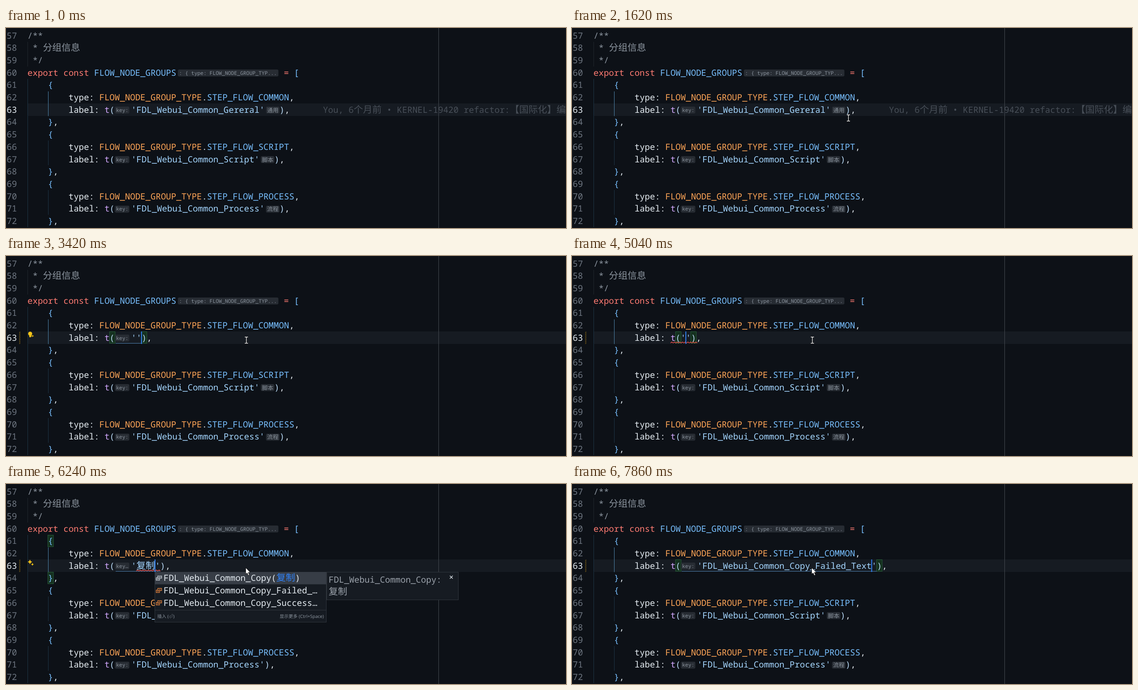
Recreate the animation shown at these times as an HTML page. Size 1251 px wide and 448 px high, loop 8 s.

```html
<!DOCTYPE html>
<html lang="zh-CN">
<head>
<meta charset="utf-8">
<title>Editor</title>
<style>
html, body { margin: 0; width: 100%; height: 100%; overflow: hidden; background: #0d1117; }
svg { display: block; width: 100vw; height: 100vh; }
text { white-space: pre; font: 500 19.1px "Noto Sans Mono", monospace; text-rendering: geometricPrecision; }
text.han { font: 300 20.8px "Noto Sans CJK SC", "Noto Sans CJK", sans-serif; }
text.hint { font-size: 11.4px; font-weight: 400; }
text.tail { font: 300 12.8px "Noto Sans CJK SC", "Noto Sans CJK", sans-serif; }
text.ime { font: 13px "Noto Sans", "Noto Sans CJK SC", sans-serif; }
text.foot { font: 300 10px "Noto Sans", "Noto Sans CJK SC", sans-serif; }
</style>
</head>
<body>
<svg viewBox="0 0 1251 448" preserveAspectRatio="none"><g id="page"></g><g id="live"></g></svg>
<script>
const CH = 11.46, HAN = 20.8, ROW = 27.67, LEFT = 48, LOOP = 8000, STEP = 60;
const C = {
  fg: '#e6edf3', dim: '#8b949e', num: '#6e7681', key: '#ff7b72', name: '#79c0ff', type: '#ffa657',
  fn: '#d2a8ff', str: '#a5d6ff', par: '#b9d9f5', blame: '#484f58', blue: '#2f81f7', panel: '#161b22',
  edge: '#30363d', chip: '#272c33', row: '#373d46', gold: '#f5c518', guide: '#1d3546'
};
const PRE = 'FDL_Webui_Common_';
const isHan = c => c >= '\u3000';
const width = s => [...s].reduce((w, c) => w + (isHan(c) ? HAN : CH), 0);
const base = row => Math.round(23.8 + ROW * row);
const rowTop = row => Math.round(3.3 + ROW * row);

const rect = (x, y, w, h, fill, more = '') =>
  `<rect x="${x}" y="${y}" width="${w}" height="${h}" fill="${fill}" ${more}/>`;
const path = (d, stroke, fill = 'none', w = 1) =>
  `<path d="${d}" stroke="${stroke}" fill="${fill}" stroke-width="${w}"/>`;
const label = (x, y, s, fill, cls = '') => `<text x="${x}" y="${y}" fill="${fill}" class="${cls}">${s}</text>`;

// Code text: Latin runs sit on the column grid, Han runs are wider.
function write(x, y, s, fill) {
  let out = '';
  for (const run of s.match(/[\u3000-\uffff]+|[^\u3000-\uffff]+/g) || []) {
    out += label(x.toFixed(2), y, run, fill, isHan(run[0]) ? 'han' : '');
    x += width(run);
  }
  return out;
}
function line(col, row, ...parts) {
  let x = LEFT + col * CH, out = '';
  for (const [s, fill] of parts) {
    out += write(x, base(row), s, fill);
    x += width(s);
  }
  return out;
}
const chip = (x, row, w, s, cls = 'hint') =>
  rect(x, rowTop(row) + 7, w, 15.5, C.chip, 'rx="3"') +
  label(x + 2.5, base(row) + (cls === 'tail' ? -1.4 : -2.2), s, C.dim, cls);
const match = (x, row) =>
  rect(x, rowTop(row) + .5, CH + 1, 26, '#15301f', 'stroke="#28603a"');
const guide = (x, row, n, fill) => rect(x, rowTop(row), 1, ROW * n, fill);

// The "label: t('…')," row; returns markup and the places inside it.
function call(row, { hint = '', body = '', tail = '' }) {
  const open = LEFT + 16 * CH;
  const from = open + CH + (hint ? 37 : 0);
  const end = from + width(body);
  const close = end + (tail ? 33 : 0);
  const svg = line(8, row, ['label: ', C.fg], ['t', C.fn], ['(', C.par]) +
    (hint ? chip(243.5, row, 32, hint) : '') +
    write(from, base(row), body, C.str) +
    (tail ? chip(end + 3, row, 30, tail, 'tail') : '') +
    write(close, base(row), ')', C.par) + write(close + CH, base(row), ',', C.fg);
  return { svg, open, from, end, close };
}

function drawPage() {
  let s = '';
  for (let i = 0; i < 16; i++) s += label(1.6, base(i), 57 + i, i === 6 ? C.fg : C.num);
  s += guide(48, 1, 2, '#21262d') + guide(48, 4, 12, C.guide);
  for (const r of [9, 13]) s += guide(94, r, 2, C.guide);
  s += line(0, 0, ['/**', C.dim]) + line(1, 1, ['* 分组信息', C.dim]) + line(1, 2, ['*/', C.dim]);
  s += line(0, 3, ['export const ', C.key], ['FLOW_NODE_GROUPS', C.name]);
  s += chip(384, 3, 224.5, ': { type: FLOW_NODE_GROUP_TYP...');
  s += write(620.4, base(3), '=', C.key) + write(643.3, base(3), '[', C.name);
  ['COMMON', 'SCRIPT', 'PROCESS'].forEach((kind, i) => {
    s += line(8, 5 + i * 4, ['type: ', C.fg], ['FLOW_NODE_GROUP_TYPE', C.type], ['.', C.fg],
      ['STEP_FLOW_' + kind, C.name], [',', C.fg]);
  });
  return s;
}

// Each entry changes part of the state at its time.
const steps = [
  [0, { hint: 'key:', body: "'FDL_Webui_Common_Gereral'", tail: '通用', blame: 1, band: 1, tails: 1, pair: '' }],
  [2340, { cur: 22, pair: 'p', link: 1 }],
  [2400, { sel: 1, band: 0, cur: 25 }],
  [2760, { bulb: 'lamp' }],
  [2940, { sel: 0, band: 1, body: "''", tail: '', cur: 1, blame: 0 }],
  [3060, { dirty: 1 }],
  [3420, { cur: 2 }],
  [3660, { body: "'", cur: 1, pair: '' }],
  [3720, { pair: 'b', link: 0 }],
  [3780, { hint: '' }],
  [3840, { body: '', cur: 0, pair: 'p' }],
  [3900, { bulb: '' }],
  [4140, { body: "'", cur: 1, pair: 'o' }],
  [4560, { wave: [220, 256], pair: '' }],
  [4620, { cur: -1 }],
  [4800, { body: '', cur: 0, pair: 'p' }],
  [5040, { body: "''", cur: 1, wave: [220, 278] }],
  [5520, { body: "'f'", cur: 2, comp: 1 }],
  [5580, { hint: 'key:', wave: 0, link: 1, ime: 'f', bulb: 'stars' }],
  [5640, { popup: 'all' }],
  [5700, { tails: 0 }],
  [5760, { body: "'fu'", cur: 3, ime: 'fu' }],
  [5880, { body: "'fuz'", cur: 4, ime: 'fuzhi' }],
  [5940, { body: "'fuzh'", cur: 5 }],
  [6000, { body: "'fuzhi'", cur: 6 }],
  [6120, { body: "'复制'", cur: 3, comp: 0, ime: '', popup: '', pair: 'b', hint: 'key…' }],
  [6180, { popup: 'copy', pick: 0, doc: 0, wave: [291, 344] }],
  [6300, { pair: 'p' }],
  [6420, { hint: 'key:', wave: 0, tails: 1 }],
  [6720, { cur: -1, pick: 1 }],
  [6780, { doc: 1 }],
  [6960, { bulb: '' }],
  [7200, { cur: 3 }],
  [7680, { cur: -1 }],
  [7860, { body: "'FDL_Webui_Common_Copy_Failed_Text'", cur: 34, popup: '' }]
];
const stateAt = t => Object.assign({}, ...steps.filter(s => s[0] <= t).map(s => s[1]));

const track = [
  [180, 977, 100.5], [360, 800, 130], [540, 665, 162], [720, 595, 186], [960, 562, 192],
  [1140, 557, 206], [1320, 590, 216], [1500, 633, 211], [1620, 617.5, 201.5], [1740, 614, 162],
  [1800, 600, 166], [1920, 575, 168], [2160, 537, 188.5]
];
function mouseAt(t) {
  const i = track.findIndex(p => p[0] > t);
  if (i < 0) return track[track.length - 1].slice(1);
  const [a, b] = [track[i - 1], track[i]], k = (t - a[0]) / (b[0] - a[0]);
  return [a[1] + (b[1] - a[1]) * k, a[2] + (b[2] - a[2]) * k];
}
function mouse(t) {
  if (t < track[0][0]) return '';
  if (t >= 5640) return path('M535.5 187.500v14.500l3.200-3 2.500 5.800 2.500-1-2.500-5.700h4.500z'.replace(/00/g, ''), '#000', '#fff', .8);
  const [x, y] = mouseAt(t);
  const d = `M${x - 3.5} ${y - 7}h2.5l1 1 1-1h2.5M${x} ${y - 6}v12M${x - 3.5} ${y + 7}h2.5l1-1 1 1h2.5`;
  return path(d, '#000', 'none', 2.4) + path(d, '#fff', 'none', 1.3);
}

const star = (x, y, r) => {
  const q = r * .32;
  return path(`M${x} ${y - r}L${x + q} ${y - q} ${x + r} ${y} ${x + q} ${y + q} ${x} ${y + r} ${x - q} ${y + q} ${x - r} ${y} ${x - q} ${y - q}z`, 'none', C.gold);
};
const bulbs = {
  lamp: `<circle cx="54" cy="174" r="4.5" fill="${C.gold}"/>` + rect(52, 177, 4, 5, C.gold, 'rx="1"') +
    path('M57 178l2 3M59 177.5l2.5 2.5', C.gold, 'none', 1.6),
  stars: star(53.5, 174.5, 5.2) + star(59, 180, 3.2)
};

function wave(a, b) {
  let d = `M${a} 195`;
  for (let x = a, up = true; x < b; x += 3, up = !up) d += `l3 ${up ? -2.6 : 2.6}`;
  return path(d, '#f85149', 'none', 1.1);
}

const all = ['Accuracy_Sea…', 'Activator_Mo…', 'Add(添加)', 'Add_Conditio…', 'Add_Field(添…',
  'Add_Field_Va…', 'Add_Row(添加…', 'Add_Task(添…', 'Add_To(添加…'];
const copies = ['Copy(复制)', 'Copy_Failed_…', 'Copy_Success…'];

function icon(x, y, c) {
  return path(`M${x + 4} ${y - 5}h8.5v5h-8.5zM${x + 8} ${y}v4.5h-7.5v-5.5h3.5`, c, 'none', 1.2) +
    path(`M${x + 6} ${y - 2.5}h4.5M${x + 2} ${y + 2}h4`, c, 'none', 1);
}
function docs(x, a, b) {
  return rect(x + .5, 197.5, 294, 62, C.panel, `stroke="${C.edge}"`) +
    write(x + 4.8, 221, a, '#9ba2ab') + write(x + 4.8, 248, b, '#9ba2ab') +
    path(`M${x + 275.5} 205.5l6.5 6.5m0-6.5l-6.5 6.5`, C.fg, 'none', 1.2);
}
function list(x, items, pick, h) {
  let s = rect(x + .5, 197.5, 383, h, C.panel, `stroke="${C.edge}"`);
  items.forEach((it, i) => {
    const on = i === pick, y = base(7 + i);
    if (on) s += rect(x + 1, 197 + i * ROW, 382, ROW, C.row);
    s += icon(x + 3, 211 + i * ROW, on ? C.fg : '#f0883e');
    let tx = x + 20;
    for (const part of (PRE + it).split(/(复制)/)) {
      s += write(tx, y, part, part === '复制' ? C.blue : C.fg);
      tx += width(part);
    }
  });
  return s;
}
function popup(st) {
  if (st.popup === 'all') return docs(674, PRE + 'Accura', 'cy_Search: 精确匹配') + list(290.5, all, 0, 260);
  if (st.popup !== 'copy') return '';
  const doc = st.doc ? ['Copy_F', 'ailed_Text: 复制失败'] : ['Copy:', '复制'];
  return docs(716, PRE + doc[0], doc[1]) + list(332, copies, st.pick, 112) +
    rect(332, 282, 384, 1, C.edge) + label(338, 300, '插入 (⏎)', C.dim, 'foot') +
    `<text x="710" y="300" text-anchor="end" class="foot" fill="${C.dim}">显示更多 (Ctrl+Space)</text>`;
}

const words = {
  f: '发 分 放 法 非 方 风', fu: '复 付 服 副 富 福 府', fuzhi: '复制 负值 赋值 付之 富智'
};
function imeBar(typed) {
  const items = words[typed].split(' '), pair = items[0].length > 1;
  let s = rect(291, 196.5, 514.5, 29.5, '#2c2c2c', 'rx="5" stroke="#3c3c3c"') +
    rect(294, 199, pair ? 70 : 55, 24, '#393939', 'rx="4"') + rect(293.5, 204, 3, 15, '#c3ccd6', 'rx="1.5"');
  items.forEach((w, i) => s += label(303.5 + i * (pair ? 78 : 58.8), 216, `${i + 1} ${w}`, '#fff', 'ime'));
  for (const x of [707, 752, 780]) s += rect(x, 200, 1, 23, '#454545');
  return s + path('M722 207.5v8l-6-4z', 'none', '#6b6b6b') + path('M738 207.5v8l6-4z', 'none', '#fff') +
    path('M768 205h-4q-3 0-3 3v6q0 3 3 3h7q3 0 3-3v-2', '#fff', 'none', 1.3) +
    path('M770.5 212l-3.5-3.5q-1-3 1.5-3.5 1.5 0 2 1.3 .5-1.3 2-1.3 2.5 .5 1.5 3.5z', 'none', '#fff') +
    path('M788.5 209l5 5 5-5', '#fff', 'none', 1.4);
}

function drawLive(t) {
  const st = stateAt(t), c = call(6, st);
  let s = '';
  if (st.band) s += rect(48, 169, 1203, 28, C.panel);
  s += guide(48, 6, 1, C.guide) + guide(94, 5, 2, '#4f86ad');
  if (st.dirty) {
    s += rect(29.5, 169, 2.5, 28, '#2a2415');
    for (let y = 170; y < 196; y += 4) s += path(`M29.5 ${y + 3}l2.5-3`, '#5c491b', 'none', 1.2);
  }
  if (st.sel) s += rect(c.from + CH, 169, width(st.body) - 2 * CH, 28, '#1e4273');
  if (st.pair === 'p' || st.pair === 'o') s += match(c.open, 6);
  if (st.pair === 'p') s += match(c.close - .5, 6);
  if (st.pair === 'b') s += match(93.5, 4) + match(93.5, 7);
  for (const r of [4, 8, 12]) s += line(4, r, ['{', C.name]) + line(4, r + 3, ['}', C.name], [',', C.fg]);
  s += c.svg;
  [['Script', '脚本', 10], ['Process', '流程', 14]].forEach(([w, tail, r]) =>
    s += call(r, { hint: 'key:', body: `'${PRE}${w}'`, tail: st.tails ? tail : '' }).svg);
  if (st.link) s += rect(245, 195, c.end - 245, 1, '#4c7fb0');
  if (st.wave) s += wave(...st.wave);
  if (st.comp) s += rect(c.from + CH, 192, width(st.body) - 2 * CH, 1, C.dim);
  if (st.cur >= 0) {
    const x = c.from + width(st.body.slice(0, st.cur)) - 1;
    s += rect(x, 169, st.comp ? 1 : 2, 28, st.comp ? '#3d6ea8' : C.blue);
  }
  if (st.bulb) s += bulbs[st.bulb];
  if (st.blame) s += write(708, base(6), 'You, 6个月前 • KERNEL-19420 refactor:【国际化】编', C.blame);
  s += rect(966, 0, 1, 448, '#454a51');
  return s + popup(st) + (st.ime ? imeBar(st.ime) : '') + mouse(t);
}

const live = document.getElementById('live');
document.getElementById('page').innerHTML = drawPage();
const start = performance.now();
let last = -1;
function tick() {
  const t = Math.floor(((performance.now() - start) % LOOP) / STEP) * STEP;
  if (t !== last) live.innerHTML = drawLive(last = t);
  requestAnimationFrame(tick);
}
tick();
</script>
</body>
</html>
```
